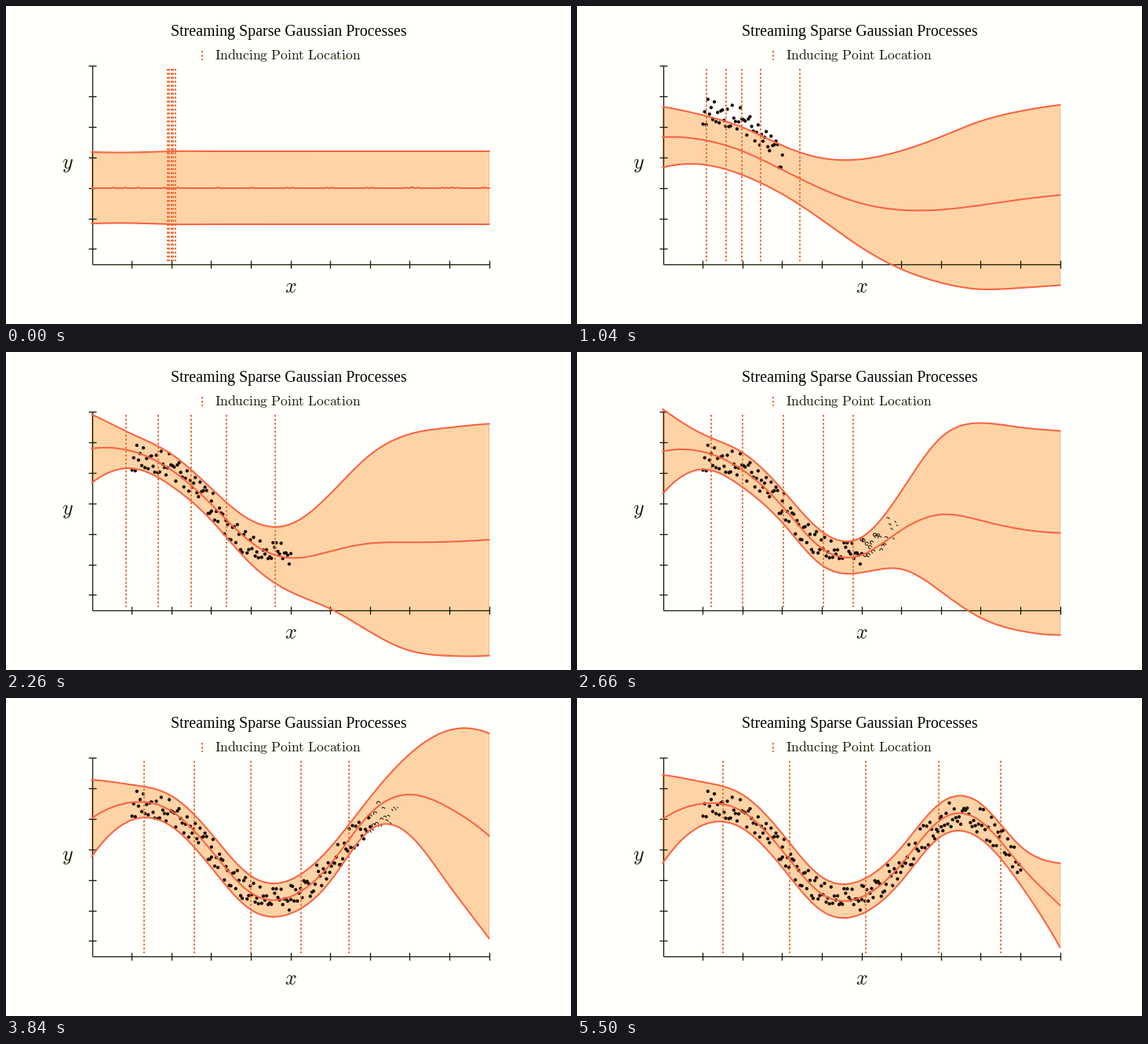
Recreate the animation shown at these times as a matplotlib script. Size 720 px wide and 405 px high, loop 5.52 s.

```python
import numpy as np
import matplotlib.pyplot as plt
from matplotlib.animation import FuncAnimation
from matplotlib.collections import LineCollection
from matplotlib.colors import to_rgba

W, H = 720, 405
FRAMES, STEP = 276, 20
CYCLE, WRITE, MORPH = 1233, 847, 411
LAG = 0.02
BATCH = 50

PAPER, INK, DOT = "#fffffb", "#1a1a04", "#1c0c04"
LINE, FILL, EDGE, DASH = "#fd6140", "#fed4a6", "#fdb28c", "#ee7038"

UNIT = 50.6
LEFT, BASE = 109.5, 329
TOP = 76
RIGHT = LEFT + 10 * UNIT

# Posterior mean and half-width at each x tick, one row per stage
MEAN = [
    [231.5] * 11,
    [119.5, 125.5, 150.5, 191.5, 234, 266, 280.5, 280, 270, 257.5, 247.5],
    [126.5, 127, 150, 196, 250, 258.5, 227, 207, 214.5, 225.5, 230.5],
    [153, 133, 144, 194, 248, 253, 212, 147.5, 123, 140, 175.5],
    [154, 134.5, 144.5, 194, 249.5, 253.5, 212, 155, 157, 213, 264],
]
HALF = [
    [45.5, 45] + [46.5] * 9,
    [33.5, 21.5, 18.5, 19.5, 34, 63.5, 96.5, 127, 151.5, 161, 165],
    [53.5, 22.5, 22, 21, 21.5, 22.5, 49.5, 98, 124, 129.5, 130],
    [48.7, 22.5, 19.4] + [21.5] * 4 + [20.7, 51.5, 99, 130.5],
    [56, 27.5] + [21.5] * 6 + [22.5, 24.5, 53.5],
]
INDUCING = np.array([
    np.linspace(205.6, 215.8, 5),
    [136, 176.3, 210, 249.5, 334],
    [171, 211.3, 263.3, 313.5, 351.8],
    [176, 239.7, 312.2, 376.2, 437.3],
    [185.5, 270.7, 368, 461.3, 540],
])


def spline(values, u):
    """Cubic spline through values at 0, 1, 2, ..."""
    v = np.asarray(values, float)
    n = len(v)
    a = np.eye(n)
    rhs = np.gradient(v, edge_order=2)
    for i in range(1, n - 1):
        a[i, i - 1:i + 2] = 1, 4, 1
        rhs[i] = 3 * (v[i + 1] - v[i - 1])
    s = np.linalg.solve(a, rhs)
    k = np.clip(u.astype(int), 0, n - 2)
    t = u - k
    return ((1 + 2 * t) * (1 - t) ** 2 * v[k] + t * (1 - t) ** 2 * s[k]
            + t * t * (3 - 2 * t) * v[k + 1] + t * t * (t - 1) * s[k + 1])


def smooth(t):
    t = np.clip(t, 0, 1)
    tail = 1 / (1 + np.exp(5))
    return np.clip((1 / (1 + np.exp(-10 * (t - 0.5))) - tail) / (1 - 2 * tail), 0, 1)


u = np.linspace(0, 10, 241)
xs = LEFT + UNIT * u
means = np.array([spline(m, u) for m in MEAN])
halves = np.array([spline(h, u) for h in HALF])

# Noisy observations around the final mean
rng = np.random.default_rng(4)
dot_u = np.concatenate([np.linspace(2 * b + 1, 2 * b + 3, BATCH) for b in range(4)])
dot_y = spline(MEAN[4], dot_u) + rng.uniform(-18, 18, len(dot_u))
dots = np.column_stack([LEFT + UNIT * dot_u + 0.5, dot_y])
batch, order = np.divmod(np.arange(len(dots)), BATCH)

plt.rcParams["mathtext.fontset"] = "cm"
fig = plt.figure(figsize=(W / 72, H / 72), dpi=72, facecolor=PAPER)
ax = fig.add_axes([0, 0, 1, 1])
ax.set_xlim(0, W)
ax.set_ylim(H, 0)
ax.axis("off")

# Axes and ticks
ruler = [[(LEFT, TOP), (LEFT, BASE)], [(LEFT, BASE), (RIGHT, BASE)]]
ruler += [[(x, BASE - 5), (x, BASE + 5)] for x in LEFT + UNIT * np.arange(1, 11)]
ruler += [[(LEFT - 5, y), (LEFT + 5, y)] for y in TOP + 38.9 * np.arange(7)]
ax.add_collection(LineCollection(ruler, colors=INK, linewidths=1.3, zorder=2))

ax.text(360, 38, "Streaming Sparse Gaussian Processes", family="Liberation Serif",
        size=19.9, ha="center", va="baseline", color="black")
ax.text(266, 68, r"$\mathrm{Inducing\ Point\ Location}$", size=17.5,
        va="baseline", color=INK)
ax.text(78.5, 206.5, "$y$", size=26, ha="center", va="baseline", color=INK)
ax.text(362.5, 365, "$x$", size=26, ha="center", va="baseline", color=INK)

dotted = (0, (1.265, 1.265))
ax.plot([250, 250], [56.5, 69.2], color=DASH, lw=2, ls=dotted, dash_capstyle="butt")

band, = ax.fill([0, 0, 0], [0, 0, 0], fc=FILL, ec=EDGE, lw=1, zorder=1)
points = ax.scatter(dots[:, 0], dots[:, 1], s=4.3 ** 2, linewidths=0, zorder=3)
rings = LineCollection([], colors=DOT, zorder=3)
ax.add_collection(rings)
stems = LineCollection([], colors=DASH, linewidths=2, linestyles=[dotted], zorder=4)
ax.add_collection(stems)
curves = [ax.plot([], [], color=LINE, lw=2, zorder=5)[0] for _ in range(3)]

ink = np.tile(to_rgba(DOT), (len(dots), 1))


def mix(stages, t):
    """Blend the stages as each morph runs."""
    out = stages[0].copy()
    for k in range(4):
        p = smooth((t - CYCLE * k - CYCLE * 2 / 3) / MORPH)
        out += p * (stages[k + 1] - stages[k])
    return out


def draw(n):
    t = n * STEP
    mean, half = mix(means, t), mix(halves, t)
    edges = mean - half, mean, mean + half
    for curve, y in zip(curves, edges):
        curve.set_data(xs, y)
    band.set_xy(np.column_stack([np.r_[xs, xs[::-1]], np.r_[edges[0], edges[2][::-1]]]))
    stems.set_segments([[(x, 80.3), (x, 325.2)] for x in mix(INDUCING, t)])

    # Each dot has its outline drawn first, then its fill fades in
    done = (t + 25 - CYCLE * batch) / WRITE * (1 + LAG * (BATCH - 1)) - LAG * order
    done = np.clip(done, 0, 1)
    fade = np.clip(2 * done - 1, 0, 1)
    ink[:, 3] = fade
    points.set_facecolors(ink)
    arcs, widths = [], []
    for i in np.flatnonzero((done > 0.06) & (done < 1)):
        a = np.linspace(0, 2 * np.pi * min(1, 2 * done[i]), 16)
        arcs.append(dots[i] + 2 * np.column_stack([np.cos(a), -np.sin(a)]))
        widths.append(1 - fade[i])
    rings.set_segments(arcs)
    rings.set_linewidths(widths or [1])
    return [band, points, rings, stems, *curves]


anim = FuncAnimation(fig, draw, frames=FRAMES, interval=STEP, repeat=True, repeat_delay=0)
plt.show()
```
